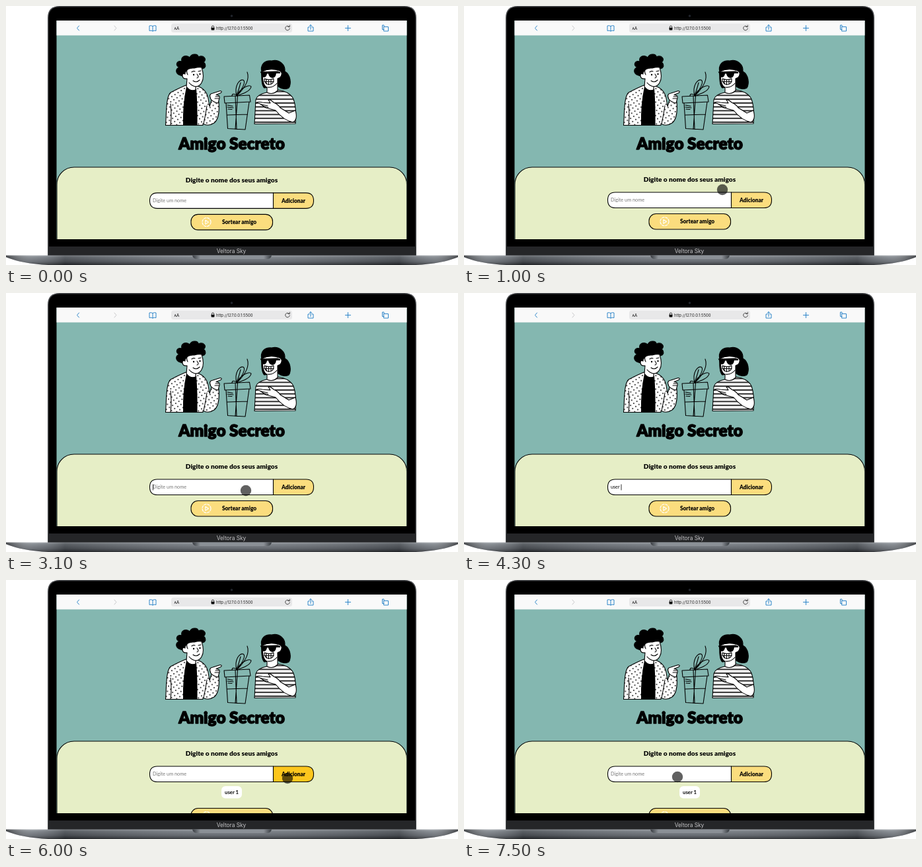
Write an HTML page that moves like this. It is 684 px wide and 392 px high and loops after 8000 ms.

```html
<!DOCTYPE html>
<html lang="pt">
<head>
<meta charset="utf-8">
<title>Amigo Secreto</title>
<style>
  html, body { margin: 0; width: 100%; height: 100%; overflow: hidden; background: #fff; }
  svg { display: block; width: 684px; height: 392px; }
  text { font-family: Lato, sans-serif; }
  .bold { font-weight: 900; }
  .mid { text-anchor: middle; }
  .ui { font-family: Inter, sans-serif; }
  .icon { fill: none; stroke: #2f86c9; stroke-width: 1; stroke-linecap: round; stroke-linejoin: round; }
  .ink { stroke: #000; stroke-width: 1.1; stroke-linecap: round; stroke-linejoin: round; }
  .line { fill: none; }
  .white { fill: #fff; }
</style>
</head>
<body>
<svg viewBox="0 0 684 392">
  <defs>
    <clipPath id="screen"><rect x="76.5" y="22" width="530" height="331"/></clipPath>
    <pattern id="dots" width="8" height="8" patternUnits="userSpaceOnUse" patternTransform="rotate(12)">
      <rect width="8" height="8" fill="#fff"/>
      <circle cx="2" cy="2" r=".9"/><circle cx="6" cy="6" r=".9"/>
    </pattern>
    <pattern id="stripes" width="8" height="5.8" y="1" patternUnits="userSpaceOnUse">
      <rect width="8" height="5.8" fill="#fff"/><rect width="8" height="1.6"/>
    </pattern>
    <linearGradient id="metal" x2="0" y2="1">
      <stop stop-color="#9a9fa5"/><stop offset=".2" stop-color="#737980"/>
      <stop offset=".65" stop-color="#555a61"/><stop offset="1" stop-color="#24272b"/>
    </linearGradient>
    <linearGradient id="shade">
      <stop stop-color="#111" stop-opacity=".55"/><stop offset=".06" stop-color="#fff" stop-opacity=".15"/>
      <stop offset=".13" stop-color="#111" stop-opacity=".25"/><stop offset=".5" stop-color="#fff" stop-opacity=".1"/>
      <stop offset=".87" stop-color="#111" stop-opacity=".25"/><stop offset=".94" stop-color="#fff" stop-opacity=".15"/>
      <stop offset="1" stop-color="#111" stop-opacity=".55"/>
    </linearGradient>
    <linearGradient id="notch">
      <stop stop-color="#35393e"/><stop offset=".1" stop-color="#8b9096"/>
      <stop offset=".9" stop-color="#8b9096"/><stop offset="1" stop-color="#35393e"/>
    </linearGradient>
  </defs>

  <!-- laptop -->
  <path d="M63 378V18Q63 0 81 0H603Q621 0 621 18V378Z" fill="#4b4d50"/>
  <path d="M64.5 378V18Q64.5 1.5 81 1.5H603Q619.5 1.5 619.5 18V378Z"/>
  <rect x="64.5" y="364" width="555" height="14" fill="#252628"/>
  <circle cx="341.500" cy="15" r="1.8" fill="#20242c"/>
  <path id="base" d="M0 377.500H684V380Q660 390 620 392H64Q24 390 0 380Z" fill="url(#metal)"/>
  <path d="M0 377.500H684V380Q660 390 620 392H64Q24 390 0 380Z" fill="url(#shade)"/>
  <path d="M282 377.500H402Q401 383 394 383H290Q283 383 282 377.500Z" fill="url(#notch)"/>
  <text class="ui mid" x="341" y="374" font-size="8.300" fill="#c4c4c6">Veltora Sky</text>

  <g clip-path="url(#screen)">
    <rect x="76" y="22" width="532" height="332" fill="#84b7b0"/>

    <!-- browser bar -->
    <rect x="76" y="22" width="532" height="22.500" fill="#f9f9f9"/>
    <rect x="250" y="26.500" width="183" height="13.500" rx="3.500" fill="#e8e8e9"/>
    <g class="icon">
      <path d="M110.500 30L107.500 33.500L110.500 37"/>
      <path d="M164 30L167 33.500L164 37" stroke="#c9c9cb"/>
      <path d="M222 30.500Q219.500 29 217 30V37.500Q220 36.500 222 38Q224 36.500 227 37.500V30Q224.500 29 222 30.500V38"/>
      <path d="M459 32H457V38H465V32H463M461 35.500V28.500M459 30.500L461 28.500L463 30.500"/>
      <path d="M517.500 29.500V37.500M513.500 33.500H521.500"/>
      <path d="M572 31.500V29H569.500V35.500H572M572 31.500H578.500V38H572Z"/>
      <path d="M428.500 31.300A3.300 3.300 0 1 0 429.300 34M429.300 29.200V31.600H426.800" stroke="#222" stroke-width=".8"/>
      <path d="M311.300 33V31.700A1.700 1.700 0 0 1 314.700 31.700V33" stroke="#111" stroke-width=".8"/>
    </g>
    <rect x="310.600" y="32.700" width="4.800" height="3.700" rx=".6"/>
    <text class="ui" x="254.500" y="35.800" font-size="5">A<tspan font-size="6">A</tspan></text>
    <text class="ui" x="318" y="35.800" font-size="5.900" fill="#222">http://127.0.0.1:5500</text>

    <!-- man -->
    <path class="ink" fill="url(#dots)" d="M241.500 180.500C243 160 242 138 249 131Q258 126 272 120L289 121Q303 125 306 140L308 152L312 140L322 145Q324 170 315 177Q306 183 298 178V180.500Z"/>
    <path d="M273 122Q267 150 268 180.500H289.500Q290 150 288 125Q280 130 273 122Z"/>
    <path class="ink line" d="M304 151Q302 165 299 178M249 148Q251 166 249 180"/>
    <path class="ink white" d="M310 141Q306 133 313 132L324 128.500Q328 129 325 131.500L318 134.500Q324 135 323 139L321 147Q314 146 310 141Z"/>
    <path class="ink line" d="M317 137H322M316 140H322"/>
    <path class="ink" d="M264 105C256 103 256 95 262 93C255 89 259 82 266 84C264 76 273 73 278 78C281 71 291 72 291 77C299 73 305 81 299 85C305 90 300 97 295 94L272 108Z"/>
    <path class="ink white" d="M271 101Q274 93 285 94Q291 92 296 93C299 102 299 111 296 116Q293 122 287 122L287 127Q279 130 273 122L274 110Q267 111 267 105Q267 101 271 103Z"/>
    <path class="ink line" d="M281 100Q283 98 286 99M291 99L295 98M289 103Q293 108 289 109M283 113Q288 117 293 112M274 96Q273 101 275 104M277 116Q281 121 287 122"/>
    <circle cx="284" cy="104" r="1.200"/><circle cx="293.500" cy="103" r="1.200"/>

    <!-- gift -->
    <g class="ink line" stroke-width=".9">
      <path d="M330 137L368.500 135L370 145L331 147Z"/>
      <path d="M333 147L335.500 185.500L362 187L368 145M335 165L365.500 164M347 136L349 186.500M350.500 136L347 186.500"/>
      <path d="M335 150L343 151.500M335 153L344 154M336 156L342 156.500"/>
      <path d="M349 136C345 119 354 111 359 112C364 115 356 128 349 136C354 124 369 118 371 122C370 129 358 133 349 136"/>
      <path d="M351 134C363 122 369 111 365 100M349 136Q353 124 355 116M350 135Q342 131 342 136"/>
    </g>

    <!-- woman -->
    <path class="ink" d="M387 101C384 88 392 82 402 83C414 80 423 89 422 99C431 104 432 118 428 124Q420 128 411 121L391 124Q386 120 387 101Z"/>
    <path class="ink" fill="url(#stripes)" d="M376 178.500L378 142Q380 134 394 131L412 127Q430 130 435 141Q440 154 438 178Z"/>
    <path class="ink white" d="M388 99Q400 93 414 98Q420 101 415 108L411 110V128Q404 135 395 131V123Q388 121 388 99Z"/>
    <path class="ink line" d="M396 123Q404 124 410 117"/>
    <path d="M384.500 99.500L411 98.500L415 100V102L409 102Q408 109 403 109Q398 108 397 102.500H395Q394 108 390 108Q386 107 386 102Z"/>
    <path class="ink white" d="M391 110Q398 113 405 110Q406 118 398 119Q391 118 391 110Z"/>
    <path class="ink line" stroke-width=".7" d="M391 114.500H405M394 111V118M397.500 112V119M401 112V118"/>
    <path class="ink white" d="M438 158Q442 172 434 176Q420 173 408 158L393 154L386 149Q382 146 378 147Q380 144 388 146L400 147L397 142Q400 141 405 146Q412 149 415 154L428 162Z"/>
    <path class="ink line" d="M386 149L396 151M390 152L397 153.500"/>

    <text class="bold mid" x="341.500" y="217" font-size="24.300" stroke="#000" stroke-width="1.300" stroke-linejoin="round">Amigo Secreto</text>

    <!-- form -->
    <rect class="ink" x="77" y="244" width="529.500" height="160" rx="26" fill="#e6eec6"/>
    <g id="form">
      <text class="bold mid" x="341.500" y="266" font-size="10.100">Digite o nome dos seus amigos</text>
      <path class="ink white" d="M404.500 282V305.500H229Q217.500 305.500 217.500 293.700T229 282Z"/>
      <path id="add" class="ink" d="M404.500 282V305.500H454Q465.500 305.500 465.500 293.700T454 282Z"/>
      <text class="bold mid" x="435" y="296.800" font-size="8.300">Adicionar</text>
      <text id="hint" x="222" y="296.300" font-size="7.300" fill="#777">Digite um nome</text>
      <text id="typed" x="222" y="296.300" font-size="7.200"></text>
      <path id="squiggle" d="M222 298.500H235.500" stroke="#e33" stroke-width=".9" stroke-dasharray="1.500 .5"/>
      <rect id="caret" y="289.500" width=".8" height="9"/>
      <g id="friend">
        <rect x="326" y="312" width="31" height="18.500" rx="6" fill="#fff"/>
        <text class="mid" x="341.500" y="324.300" font-size="7.700" font-weight="700">user 1</text>
      </g>
      <g id="draw">
        <rect class="ink" x="280" y="314.500" width="123.500" height="23.500" rx="10.500" fill="#fbdd7e"/>
        <circle cx="303.500" cy="326.200" r="6.500" fill="none" stroke="#fff" stroke-width="1.200" stroke-dasharray="4.100 1"/>
        <path d="M301.800 323.200L306.500 326.200L301.800 329.200Z" fill="none" stroke="#fff" stroke-width="1.100" stroke-linejoin="round"/>
        <text class="bold mid" x="353" y="329" font-size="8.300">Sortear amigo</text>
      </g>
    </g>
    <circle id="pointer" r="8.200" fill="#000" fill-opacity=".62"/>
  </g>
</svg>
<script>
  const LOOP = 8000;
  const el = id => document.getElementById(id);
  const [form, add, hint, typed, squiggle, caret, friend, draw, pointer] =
    ['form', 'add', 'hint', 'typed', 'squiggle', 'caret', 'friend', 'draw', 'pointer'].map(el);
  const show = (node, on) => node.style.display = on ? '' : 'none';
  const within = (t, from, to) => t >= from && t < to;

  // Pointer visits: [time, x, y]
  const visits = [
    [[1000, 391, 278], [1300, 396, 271], [1400, 396, 271], [1800, 363, 299], [3600, 363, 299]],
    [[5300, 396, 311], [5400, 410, 305], [5700, 426, 300], [6200, 426, 300], [6700, 323, 298], [LOOP, 323, 298]]
  ];
  const typing = [[3300, 'u'], [3600, 'us'], [3700, 'user'], [4300, 'user\u00a0'], [4400, 'user 1'], [5900, '']];
  const caretOn = [[1500, 2000], [2500, 5000], [7000, 7500]];
  const caretX = { '': 222, 'u': 226.4, 'us': 229.6, 'user': 236.3, 'user\u00a0': 237.6, 'user 1': 241.2 };

  function pointerAt(t) {
    const path = visits.find(p => within(t, p[0][0], p[p.length - 1][0]));
    if (!path) return null;
    const i = path.findIndex(p => p[0] > t);
    const [t0, x0, y0] = path[i - 1], [t1, x1, y1] = path[i];
    const k = (t - t0) / (t1 - t0);
    return [x0 + (x1 - x0) * k, y0 + (y1 - y0) * k];
  }

  function render(t) {
    const text = typing.reduce((now, [at, value]) => t >= at ? value : now, '');
    typed.textContent = text;
    show(hint, !text);
    show(squiggle, within(t, 4500, 5900));
    show(caret, caretOn.some(([from, to]) => within(t, from, to)));
    caret.setAttribute('x', caretX[text]);

    const added = t >= 5900;
    show(friend, added);
    draw.setAttribute('transform', `translate(0 ${added ? 31 : 0})`);
    form.setAttribute('transform', `translate(0 ${Math.max(0, 1 - t / 900) * 0.9})`);

    const pos = pointerAt(t);
    show(pointer, pos);
    if (pos) pointer.setAttribute('transform', `translate(${pos})`);
    const hover = pos && pos[0] > 404 && within(pos[1], 282, 306);
    add.setAttribute('fill', hover ? '#fcc61d' : '#fbdd7e');
  }

  function tick() {
    render(performance.now() % LOOP);
    requestAnimationFrame(tick);
  }
  tick();
</script>
</body>
</html>
```
